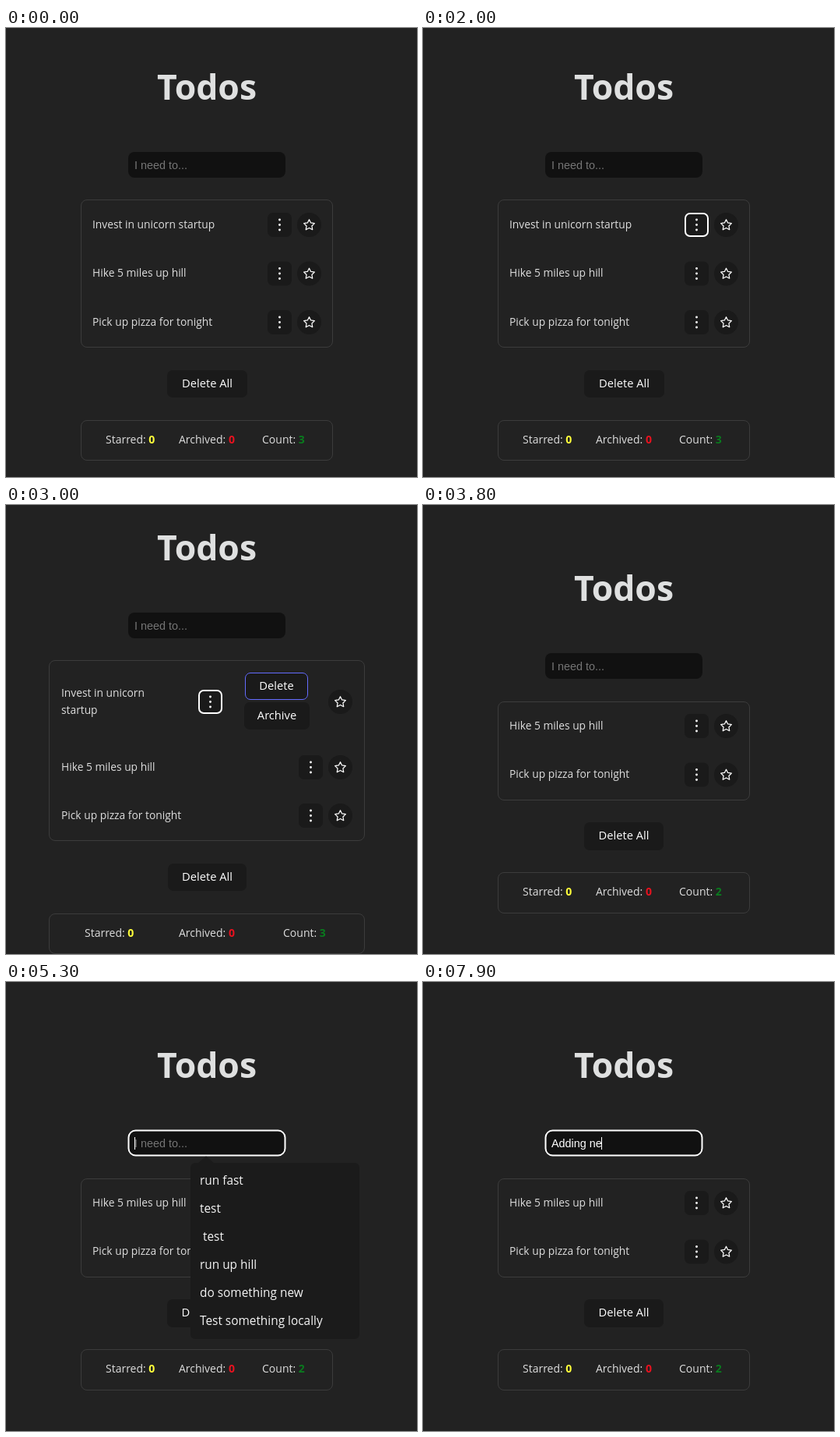
An HTML page with a canvas that plays this animation: 528x576 px, repeating every 8000 ms.

```html
<!DOCTYPE html>
<html lang="en">
<head>
<meta charset="utf-8">
<title>Todos</title>
<style>
  html, body { margin: 0; width: 100%; height: 100%; overflow: hidden; background: #222; }
  canvas { display: block; }
</style>
</head>
<body>
<canvas id="stage" width="528" height="576"></canvas>
<script>
const ctx = document.getElementById('stage').getContext('2d');
const LOOP = 8000;
const UI = '"Open Sans", "Noto Sans", sans-serif';
const FONT = {
  title: `700 44.5px ${UI}`,
  row: `400 13.8px ${UI}`,
  button: `500 14.7px ${UI}`,
  stat: `400 14px ${UI}`,
  count: `700 14px ${UI}`,
  menu: `500 15.4px ${UI}`,
  input: '14.4px "Liberation Sans", Arial, sans-serif'
};
const BLUE = '100,108,255';
const DARK = '#1a1a1a';
const WHITE = '#fff';
const LINE = '#3c3c3c';
const SOFT = '#dedede';

const INVEST = 'Invest in unicorn startup';
const HIKE = 'Hike 5 miles up hill';
const PIZZA = 'Pick up pizza for tonight';
const HISTORY = ['run fast', 'test', ' test', 'run up hill', 'do something new', 'Test something locally'];

// Layout of each state; pairs are top and height.
const LAYOUTS = {
  full: {
    left: 96, right: 420, title: 92, input: 159, panel: [220, 190], clear: [207, 439, 103, 35],
    foot: [503, 52], stats: [128, 222, 329], count: 3,
    rows: [[INVEST, 252.5], [HIKE, 315], [PIZZA, 377.5]]
  },
  open: {
    left: 55, right: 461, title: 71, input: 138, panel: [199, 232], clear: [208, 460, 101, 35],
    foot: [524, 52], stats: [101, 222, 356], count: 3,
    rows: [[INVEST, 252.5], [HIKE, 336.5], [PIZZA, 398.5]]
  },
  short: {
    left: 96, right: 420, title: 123, input: 190, panel: [252, 127], clear: [207, 407, 102, 36],
    foot: [471, 53], stats: [128, 222, 329], count: 2,
    rows: [[HIKE, 283.5], [PIZZA, 346]]
  }
};

// Typed text by time.
const TYPING = [[7000, 'A'], [7200, 'Ad'], [7300, 'Add'], [7400, 'Addi'], [7500, 'Addin'],
  [7600, 'Adding'], [7800, 'Adding '], [7900, 'Adding ne']];

const between = (t, a, b) => t >= a && t < b;

// Opacity of a hover border that starts to appear at the given time.
function hover(t, start) {
  if (t < start) return 0;
  const p = Math.min(1, (t - start + 100) / 400);
  return p * (2 - p);
}

function box(x, y, w, h, r, fill, stroke, line = 1) {
  if (fill) {
    ctx.beginPath();
    ctx.roundRect(x, y, w, h, r);
    ctx.fillStyle = fill;
    ctx.fill();
  }
  if (stroke) {
    ctx.beginPath();
    ctx.roundRect(x + line / 2, y + line / 2, w - line, h - line, r - line / 2);
    ctx.strokeStyle = stroke;
    ctx.lineWidth = line;
    ctx.stroke();
  }
}

function text(str, x, y, font, color, align = 'left') {
  ctx.font = font;
  ctx.fillStyle = color;
  ctx.textAlign = align;
  ctx.fillText(str, x, y);
}

function disc(x, y, r, color) {
  ctx.beginPath();
  ctx.arc(x, y, r, 0, Math.PI * 2);
  ctx.fillStyle = color;
  ctx.fill();
}

// Blue border while hovered, white ring once focused.
function state(x, y, w, h, r, glow, focus) {
  if (focus) box(x, y, w, h, r, null, WHITE, 2);
  else if (glow > 0) box(x, y, w, h, r, null, `rgba(${BLUE},${glow})`);
}

function dots(cx, cy, glow, focus) {
  box(cx - 15.5, cy - 15.5, 31, 31, 7, DARK);
  for (const d of [-6.5, 0, 6.5]) disc(cx, cy + d, 1.45, WHITE);
  state(cx - 15.5, cy - 15.5, 31, 31, 7, glow, focus);
}

function star(cx, cy) {
  disc(cx, cy, 15.5, DARK);
  ctx.beginPath();
  for (let i = 0; i < 10; i++) {
    const r = i % 2 ? 3.6 : 7.2;
    const a = i * Math.PI / 5 - Math.PI / 2;
    ctx.lineTo(cx + r * Math.cos(a), cy + 0.4 + r * Math.sin(a));
  }
  ctx.closePath();
  ctx.strokeStyle = WHITE;
  ctx.lineWidth = 1.25;
  ctx.lineJoin = 'round';
  ctx.stroke();
}

function button(label, x, y, w, h, glow = 0, focus = false) {
  box(x, y, w, h, 7, DARK);
  text(label, x + w / 2, y + 22, FONT.button, WHITE, 'center');
  state(x, y, w, h, 7, glow, focus);
}

function drawInput(y, t) {
  const focus = t >= 5200;
  box(157, y, 202, 33, 8, '#111');
  if (focus) state(156.5, y - 0.5, 203, 34, 10, 0, true);
  else state(157, y, 202, 33, 8, hover(t, 4400), false);

  let typed = '';
  for (const [at, str] of TYPING) if (t >= at) typed = str;
  if (typed) text(typed, 165, y + 22, FONT.input, WHITE);
  else text('I need to...', 165, y + 21.5, FONT.input, '#757575');

  if (focus && !between(t, 5800, 6400)) {
    ctx.font = FONT.input;
    const x = 165 + Math.round(ctx.measureText(typed).width - 0.4);
    ctx.fillStyle = WHITE;
    ctx.fillRect(Math.max(165, x), y + 9, 1, 16);
  }
}

function drawRows(view, t) {
  const open = view === LAYOUTS.open;
  const x = view.left + (open ? 16 : 15);
  const starX = view.right - (open ? 31.5 : 30.5);
  for (const [label, cy] of view.rows) {
    const first = label === INVEST;
    if (open && first) {
      text('Invest in unicorn', x, 246, FONT.row, SOFT);
      text('startup', x, 268, FONT.row, SOFT);
      dots(262.5, cy, 0, true);
      button('Delete', 307, 215, 81, 35, hover(t, 2700), t >= 3700);
      button('Archive', 306, 253, 84, 35);
    } else {
      text(label, x, Math.floor(cy + 4.5), FONT.row, SOFT);
      dots(starX - 38, cy, first ? hover(t, 1600) : 0, first && t >= 2000);
    }
    star(starX, cy);
  }
}

function drawStats(view) {
  const [top, height] = view.foot;
  box(view.left, top, view.right - view.left, height, 8, null, LINE);
  const stats = [['Starred: ', 0, '#ffff3a'], ['Archived: ', 0, '#e8121f'], ['Count: ', view.count, '#0a7a1e']];
  stats.forEach(([label, n, color], i) => {
    const x = view.stats[i], y = top + 30;
    text(label, x, y, FONT.stat, SOFT);
    text(n, x + ctx.measureText(label).width, y, FONT.count, color);
  });
}

function drawMenu(alpha) {
  ctx.globalAlpha = alpha;
  ctx.beginPath();
  ctx.roundRect(237, 232, 217, 226, 6);
  ctx.moveTo(247, 232);
  ctx.lineTo(257, 223.5);
  ctx.lineTo(267, 232);
  ctx.fillStyle = '#1b1b1b';
  ctx.fill();
  HISTORY.forEach((item, i) => text(item, 249, 260 + i * 36, FONT.menu, '#f4f4f4'));
  ctx.globalAlpha = 1;
}

function draw(t) {
  const view = t < 2100 ? LAYOUTS.full : t < 3800 ? LAYOUTS.open : LAYOUTS.short;
  ctx.fillStyle = '#222';
  ctx.fillRect(0, 0, 528, 576);
  text('Todos', 258, view.title, FONT.title, '#dfe0e0', 'center');
  drawInput(view.input, t);
  box(view.left, view.panel[0], view.right - view.left, view.panel[1], 8, null, LINE);
  drawRows(view, t);
  button('Delete All', ...view.clear);
  drawStats(view);
  if (between(t, 5300, 7200)) drawMenu(t < 7000 ? 1 : 0.83 - (t - 7000) / 250);
}

function tick() {
  draw(Math.floor(performance.now() % LOOP / 100) * 100);
  requestAnimationFrame(tick);
}
tick();
</script>
</body>
</html>
```
